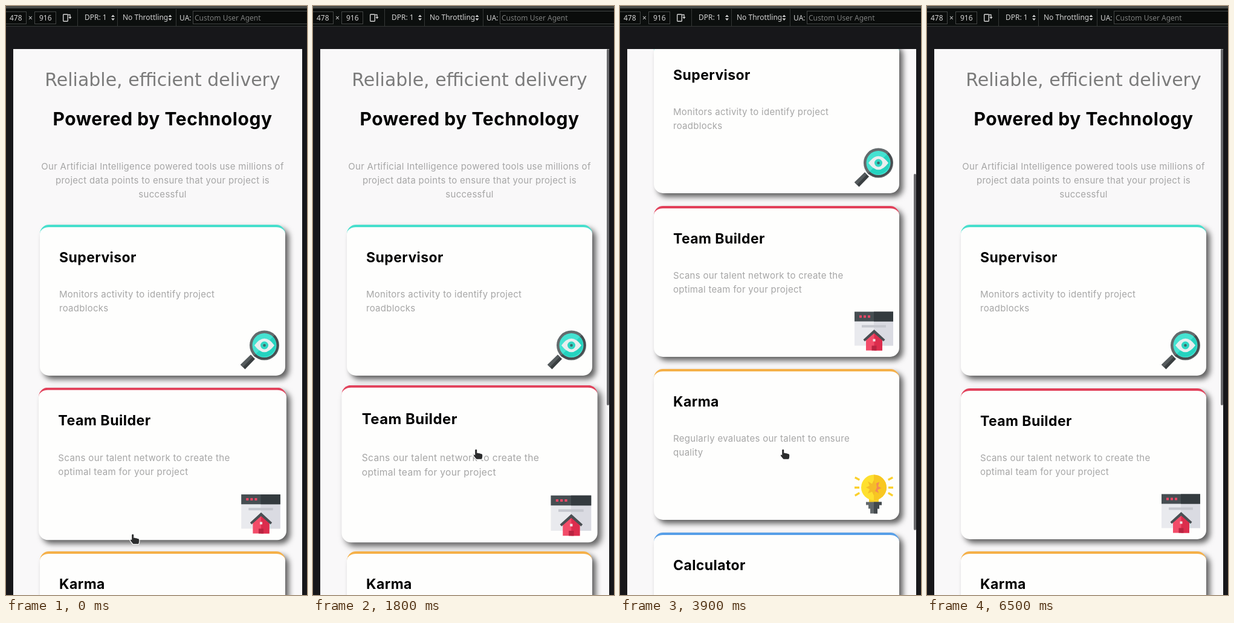
Write an HTML page that moves like this. It is 498 by 972 pixels and loops after 6.6 s.

```html
<!DOCTYPE html>
<html lang="en">
<head>
<meta charset="utf-8">
<title>Card hover and scroll</title>
<style>
html, body { margin: 0; width: 100%; height: 100%; overflow: hidden; background: #17171a; }
svg { position: absolute; display: block; overflow: visible; }
svg text { font-family: Inter, "Open Sans", sans-serif; font-optical-sizing: none; }
#stage { position: absolute; left: 0; top: 0; width: 498px; height: 972px; overflow: hidden; background: #17171a; }
#view { position: absolute; left: 12px; top: 71px; width: 478px; height: 901px; overflow: hidden; background: #f9f8f9; }
#page { position: absolute; left: 0; top: 0; width: 478px; height: 1400px; }
.card {
  position: absolute; left: 44px; width: 406px; height: 249px; box-sizing: border-box;
  border-top: 4px solid; border-radius: 15px; background: #fefefd;
  box-shadow: 6px 6px 10px rgba(0, 0, 0, .62);
}
.card svg { left: 0; top: -4px; }
#thumb { position: absolute; left: 474px; top: 0; width: 4px; height: 588px; border-radius: 2px; background: #69696c; }
#toolbar, #cursor { left: 0; top: 0; }
#toolbar text { font: 12px "Noto Sans", "Open Sans", sans-serif; fill: #d2d2d2; }
#toolbar .hint { fill: #7d7f7e; }
#toolbar .field { fill: #0a0c0b; stroke: #434645; }
.kicker { font: 30px "DejaVu Sans", sans-serif !important; fill: #7b7b7b; }
.title { font-size: 30px; font-weight: 700; letter-spacing: .55px; }
.name { font-size: 23px; font-weight: 700; letter-spacing: .42px; }
.body { font-size: 15px; letter-spacing: .29px; fill: #a6a6a6; }
.credit { font-size: 11px; letter-spacing: .15px; fill: #a0a0a0; }
.link { fill: #2b5aa8; text-decoration: underline; }
.mid { text-anchor: middle; }
</style>
</head>
<body>
<div id="stage">
  <div id="view">
    <div id="page">
      <svg width="478" height="1400">
        <g class="mid">
          <text class="kicker" x="247" y="61">Reliable, efficient delivery</text>
          <text class="title" x="247" y="126">Powered by Technology</text>
          <g class="body">
            <text x="247" y="199">Our Artificial Intelligence powered tools use millions of</text>
            <text x="247" y="222">project data points to ensure that your project is</text>
            <text x="247" y="245">successful</text>
          </g>
          <text class="credit" x="247" y="1370">Challenge by <tspan class="link">Interface Coach</tspan>. Coded by <tspan class="link">Tahmid Ouzerrane</tspan>.</text>
        </g>
      </svg>
    </div>
    <div id="thumb"></div>
  </div>

  <svg id="toolbar" width="498" height="36">
    <rect width="498" height="34" fill="#0c0f0e"/>
    <rect width="498" height="4" fill="#484b48"/>
    <path d="M0 33.5H498M118.5 5V33M184.5 5V33M281.5 5V33" stroke="#343736"/>
    <rect class="field" x="-4.5" y="9.5" width="38" height="20"/>
    <rect class="field" x="47.5" y="9.5" width="35" height="20"/>
    <rect class="field" x="309.5" y="8.5" width="200" height="21"/>
    <text x="6" y="24">478</text>
    <text x="37" y="24">×</text>
    <text x="55" y="24">916</text>
    <text x="130" y="23">DPR: 1</text>
    <text x="193" y="23">No Throttling</text>
    <text x="287" y="24">UA:</text>
    <text class="hint" x="312" y="24">Custom User Agent</text>
    <rect x="94.7" y="13.7" width="7.6" height="11.6" rx="1" fill="none" stroke="#d2d2d2" stroke-width="1.4"/>
    <path d="M103 14.5H106V19" fill="none" stroke="#d2d2d2" stroke-width="1.3"/>
    <path d="M103.5 18H108.5L106 21.5Z" fill="#d2d2d2"/>
    <path id="arrows" d="M174 18L177 14.5L180 18ZM174 20.5H180L177 24Z" fill="#d2d2d2"/>
    <use href="#arrows" x="94.5"/>
  </svg>

  <svg id="cursor" width="18" height="20">
    <path d="M3.2 2.2Q3.2 .8 4.7 .8T6.2 2.2V7L7.6 6.6L9.2 7.3L11 7.2L12.3 8L14 8.2Q15.2 8.6 15.2 10V12.5Q15.2 14.5 14 16.8H5.5Q3.5 14.8 1 11.2Q.4 9.6 1.9 9.6L3.2 10.6Z"
      fill="#2b2c2d" stroke="#fff" stroke-width="2.4" paint-order="stroke" stroke-linejoin="round"/>
  </svg>
</div>

<script>
const LOOP = 6600, STEP = 100;

const lens = `
  <path d="M17 40L24 47L7.500 64L0 56.500Z" fill="#3a3f41"/>
  <path d="M17 40L20.500 43.500L4 60.500L0 56.500Z" fill="#555b5d"/>
  <path d="M20 40L28 32L32 36L24 44Z" fill="#70777a"/>
  <circle cx="39.500" cy="24.500" r="24.500" fill="#646b6d"/>
  <path d="M56.800 7.200A24.500 24.500 0 0 1 22.200 41.800Z" fill="#474d50"/>
  <circle cx="39.500" cy="24.500" r="20" fill="#45e2d1"/>
  <path d="M53.600 10.400A20 20 0 0 1 25.400 38.600Z" fill="#25d3bf"/>
  <path d="M23 24.500Q39.500 2 56 24.500Q39.500 47 23 24.500Z" fill="#e9eeef"/>
  <circle cx="39.500" cy="24.500" r="6.500" fill="#2fd6c3"/>
  <circle cx="39.500" cy="24.500" r="2.300" fill="#43666a"/>`;

const site = `
  <path d="M0 0H64V56H0Z" fill="#e9eaee"/>
  <path d="M32 16H64V56H32Z" fill="#dadbe2"/>
  <path d="M0 0H64V16H0Z" fill="#464e52"/>
  <path d="M32 0H64V16H32Z" fill="#343b3f"/>
  <path d="M8 6h4v4h-4zM15 6h4v4h-4zM22 6h4v4h-4z" fill="#ee4766"/>
  <path d="M12 22H52V26H12Z" fill="#c6c8cf"/>
  <path d="M19 45L32.500 33L46 45V64H19Z" fill="#f24c69"/>
  <path d="M32.500 33L46 45V64H32.500Z" fill="#dc2d4d"/>
  <path d="M32.500 29.500L50.500 46L48 49L32.500 35.500L17 49L14.500 46Z" fill="#4a4f53"/>
  <path d="M30.500 45h4v4h-4z" fill="#f3e3e7"/>
  <path d="M28.500 56h8v8h-8z" fill="#b92441"/>`;

const bulb = `
  <path d="M24 37H40V46H24Z" fill="#f8cf25"/>
  <circle cx="32" cy="21" r="21" fill="#fee02f"/>
  <path d="M32 0A21 21 0 0 1 32 42Z" fill="#f8c722"/>
  <path d="M32 9L34.500 15L41 12L38.500 19L45 22L38.500 25L41 32L34.500 28L32 34L29 28L22 31L25 24L19 21L25 18L22 11L29 15Z" fill="#f5bc28"/>
  <path d="M36 14L41 12L39 19L44 22L38 25L40 30L34 27L37 21Z" fill="#f48a54"/>
  <path d="M0 6L1.500 3L9 7L7.500 10ZM0 19.500H8V23H0ZM0 33L7.500 28.500L9 31.500L1.500 36ZM64 6L62.500 3L55 7L56.500 10ZM64 19.500H56V23H64ZM64 33L56.500 28.500L55 31.500L62.500 36Z" fill="#fbd02c"/>
  <path d="M19 45H45V50H19ZM23 50H41V56H23ZM26 56H38V64H26Z" fill="#62686b"/>
  <path d="M32 45H45V50H41V56H38V64H32Z" fill="#43494c"/>`;

const screen = `
  <path d="M0 0H64V41H0Z" fill="#4a5156"/>
  <path d="M32 0H64V41H32Z" fill="#393f44"/>
  <path d="M0 41H64V53H0ZM16 60H48V64H16Z" fill="#e8eaee"/>
  <path d="M32 41H64V53H32ZM32 60H48V64H32Z" fill="#d8dae0"/>
  <path d="M24 53H40V60H24Z" fill="#c5c7cd"/>
  <circle cx="21" cy="21" r="9.500" fill="none" stroke="#549ef0" stroke-width="7"/>
  <path d="M38 10H42M45 10H57M38 17H42M45 17H57M38 24H42M45 24H57M38 31H42M45 31H57" stroke="#4b94e8" stroke-width="3.500"/>`;

const cards = [
  ["Supervisor", "#46dfcd", "Monitors activity to identify project", "roadblocks", lens],
  ["Team Builder", "#e2405a", "Scans our talent network to create the", "optimal team for your project", site],
  ["Karma", "#f5b048", "Regularly evaluates our talent to ensure", "quality", bulb],
  ["Calculator", "#579fe8", "Uses data from past projects to provide", "better delivery estimates", screen],
].map(([name, color, line1, line2, icon], i) => {
  const el = document.createElement("div");
  el.className = "card";
  el.style.top = 290 + i * 269.5 + "px";
  el.style.borderTopColor = color;
  el.innerHTML = `<svg width="406" height="249">
    <text class="name" x="32" y="62">${name}</text>
    <g class="body"><text x="32" y="120">${line1}</text><text x="32" y="143">${line2}</text></g>
    <g transform="translate(332 174.500)">${icon}</g></svg>`;
  page.append(el);
  return el;
});

// Tracks are [ms, value] points joined by straight lines.
const scrollTrack = [[1880, 0], [2290, 478], [3550, 478], [3900, 301], [4440, 0]];
const teamTrack = [[0, .0095], [1180, .078], [1880, .038], [1900, 0], [4440, 0], [5795, .078], [6390, .044], [6400, 0]];
const calcTrack = [[2290, 0], [2600, .018], [3500, .05], [3600, 0]];
const cursorX = [[1100, 205], [1600, 265]];
const cursorY = [[1100, 871], [1600, 731]];

function at(track, t) {
  const i = track.findIndex(([ms]) => ms > t);
  if (i < 0) return track[track.length - 1][1];
  if (i === 0) return track[0][1];
  const [t0, a] = track[i - 1], [t1, b] = track[i];
  return a + (b - a) * (t - t0) / (t1 - t0);
}

const stageCursor = document.getElementById("cursor");
const thumbBar = document.getElementById("thumb");
const pageBox = document.getElementById("page");
const start = performance.now();

function draw() {
  const elapsed = Math.max(0, performance.now() - start) % LOOP;
  const t = Math.floor(elapsed / STEP) * STEP;
  const scroll = at(scrollTrack, t);
  pageBox.style.transform = `translateY(${-scroll}px)`;
  thumbBar.style.transform = `translateY(${scroll * .6845}px)`;
  thumbBar.style.visibility = t < 1100 ? "hidden" : "visible";
  cards[1].style.transform = `scale(${1 + at(teamTrack, t)})`;
  cards[3].style.transform = `scale(${1 + at(calcTrack, t)})`;
  stageCursor.style.transform = `translate(${at(cursorX, t)}px, ${at(cursorY, t)}px)`;
  stageCursor.style.visibility = t < 6400 ? "visible" : "hidden";
  requestAnimationFrame(draw);
}
draw();
</script>
</body>
</html>
```
